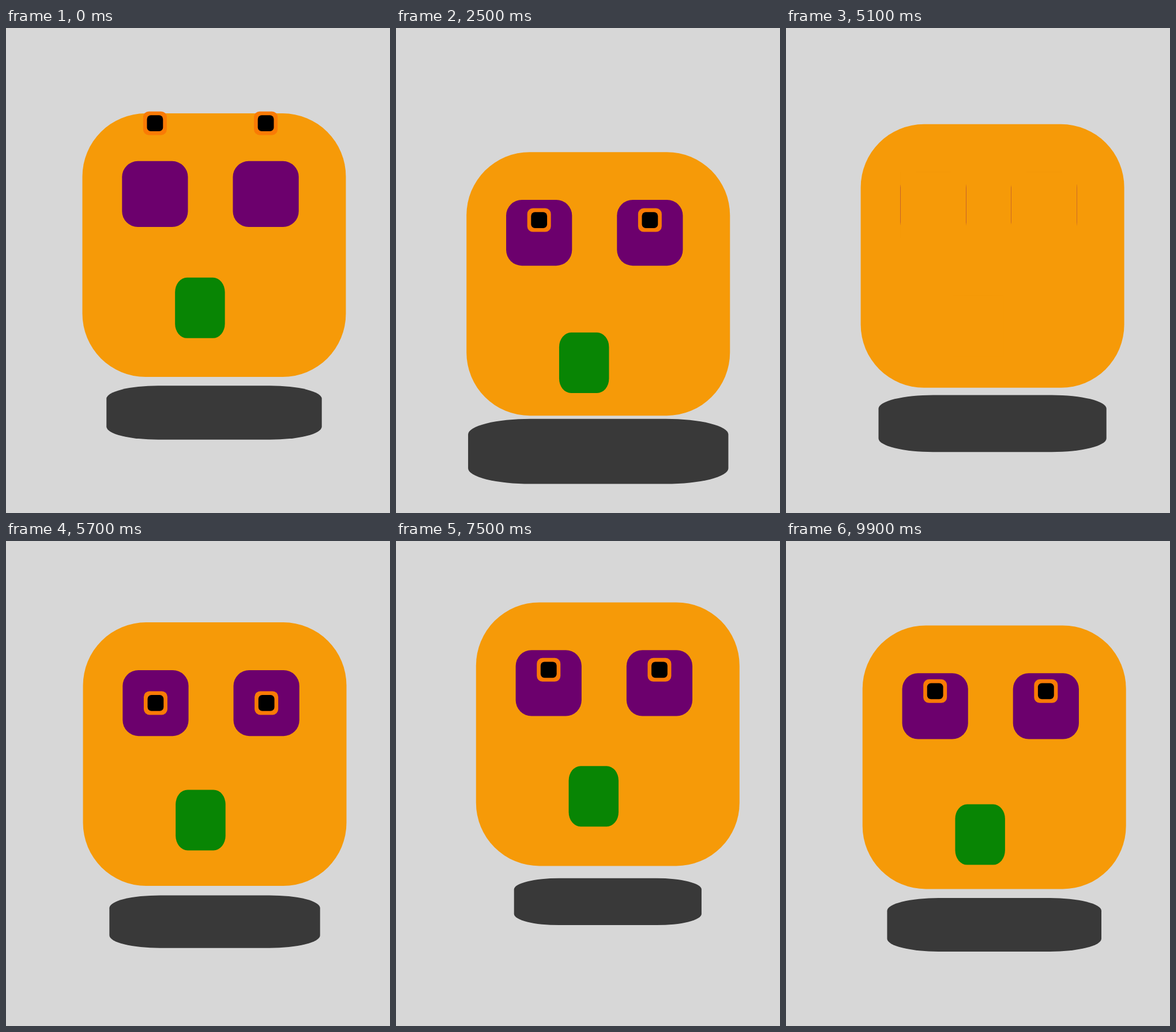
Write an HTML page with a canvas that moves like this. It is 666 px wide and 841 px high and loops after 10000 ms.

```html
<!DOCTYPE html>
<html lang="en">
<head>
<meta charset="utf-8">
<title>Floating face</title>
<style>
  html, body { margin: 0; width: 100%; height: 100%; overflow: hidden; background: #d7d7d7; }
  canvas { display: block; }
</style>
</head>
<body>
<canvas id="stage" width="666" height="841"></canvas>
<script>
const ctx = document.getElementById('stage').getContext('2d');
const LOOP = 10000, STEP = 100;
const SIZE = 457, EYE = SIZE / 4;
const COLORS = {
  back: '#d7d7d7', skin: '#f69a08', eye: '#6c006d',
  rim: '#f97b05', pupil: '#000', mouth: '#088504', shadow: '#393939'
};

const clamp = v => Math.min(1, Math.max(0, v));
const mix = (a, b, p) => a + (b - a) * p;
const mod = (a, b) => ((a % b) + b) % b;

// The standard CSS "ease" curve, solved by bisection.
function ease(x) {
  x = clamp(x);
  let lo = 0, hi = 1;
  for (let i = 0; i < 30; i++) {
    const s = (lo + hi) / 2;
    if (0.75 * s * (1 - s) + s ** 3 < x) lo = s; else hi = s;
  }
  const r = 1 - lo;
  return 0.3 * lo * r * r + 3 * lo * lo * r + lo ** 3;
}

// Eases through [time, value] stops.
function track(stops, t) {
  for (let i = 1; i < stops.length; i++) {
    const [t0, v0] = stops[i - 1], [t1, v1] = stops[i];
    if (t <= t1) return mix(v0, v1, ease((t - t0) / (t1 - t0)));
  }
  return stops[stops.length - 1][1];
}

// Goes 0 to 1 and back, each way eased.
function swing(t, half) {
  const k = mod(t, 2 * half) / half;
  return k < 1 ? ease(k) : 1 - ease(k - 1);
}

const BLINK = [[0, 1], [0.2, 1], [0.32, 0], [0.5, 0], [0.65, 1], [4, 1]];
const GAZE = [[0, 0], [1.4, 0], [2, -26], [4.5, -26], [5, 0]];

function box(x, y, w, h, color) {
  ctx.fillStyle = color;
  ctx.beginPath();
  ctx.roundRect(x, y, w, h, { x: w * 0.24, y: h * 0.24 });
  ctx.fill();
}

function square(cx, cy, size, color) {
  box(cx - size / 2, cy - size / 2, size, size, color);
}

// Two lids meet in the middle; a positive inset lets the side edges show.
function lids(x, y, w, h, open, inset) {
  if (open > 0.999) return;
  const lid = (1 - open) * h / 2;
  const edge = 0.6;
  ctx.fillStyle = COLORS.skin;
  if (open < 0.001) {
    ctx.fillRect(x + inset, y - edge, w - 2 * inset, h + 2 * edge);
    return;
  }
  ctx.fillRect(x + inset, y - edge, w - 2 * inset, lid + edge);
  ctx.fillRect(x + inset, y + h - lid, w - 2 * inset, lid + edge);
}

function draw(ms) {
  const t = 1.21 + ms / 993;        // seconds since the face woke up
  const awake = t >= 2;
  const drop = swing(t, 5);
  const open = awake ? track(BLINK, mod(t - 2, 4)) : 1;
  const gaze = awake ? track(GAZE, mod(t - 2, 5)) : -122.8;
  const x = mix(139.5, 121.5, drop);
  const y = mix(101.9, 220, drop);

  ctx.fillStyle = COLORS.back;
  ctx.fillRect(0, 0, 666, 841);

  const scale = mix(0.7, 1, drop);
  const sw = SIZE * scale, sh = SIZE / 4 * scale;
  box(x + SIZE / 2 - sw / 2, y + 519 - sh / 2, sw, sh, COLORS.shadow);
  box(x, y, SIZE, SIZE, COLORS.skin);

  for (const side of [68.8, 261]) {
    const ex = x + side, ey = y + 82.8;
    const cx = ex + EYE / 2, cy = ey + EYE / 2 + gaze;
    box(ex, ey, EYE, EYE, COLORS.eye);
    square(cx, cy, 41, COLORS.rim);
    square(cx, cy, 27.8, COLORS.pupil);
    lids(ex, ey, EYE, EYE, open, 0.2);
  }

  const mx = x + 160.7, my = y + mix(283.7, 315, swing(t - 1, 4));
  box(mx, my, 86.5, 105, COLORS.mouth);
  lids(mx, my, 86.5, 105, open, -0.6);
}

const start = performance.now();
function tick() {
  const ms = mod(performance.now() - start, LOOP);
  draw(Math.floor(ms / STEP) * STEP);
  requestAnimationFrame(tick);
}
tick();
</script>
</body>
</html>
```
